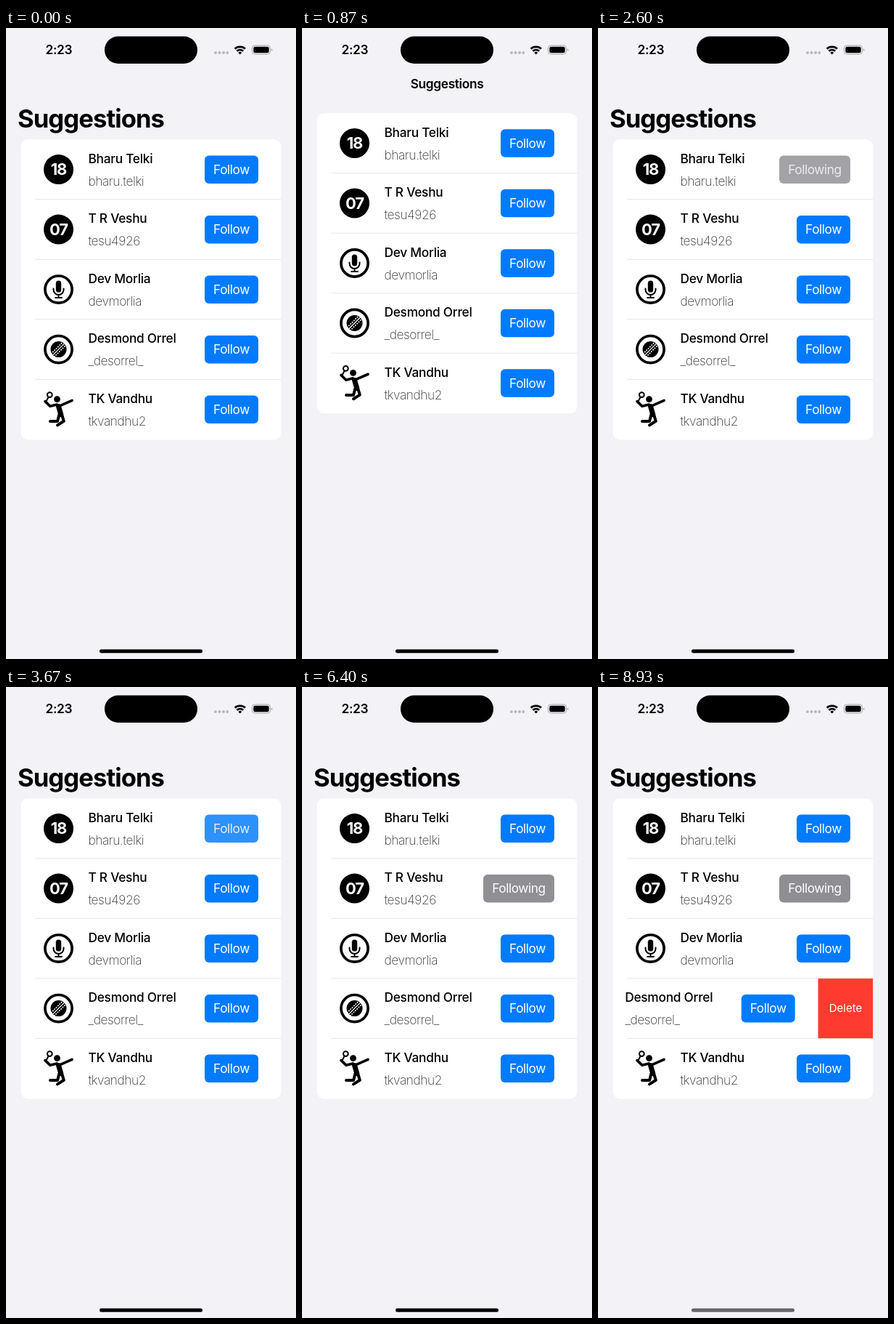
An HTML page for the animation above (9 s loop, 400 by 868 pixels).

```html
<!DOCTYPE html>
<html lang="en">
<head>
<meta charset="utf-8">
<title>Suggestions</title>
<style>
  html, body { margin: 0; width: 100%; height: 100%; overflow: hidden; background: #f2f2f7; }
  svg { display: block; width: 100%; height: 100%; }
  text { font: 400 17.3px Inter, "Liberation Sans", sans-serif; letter-spacing: -.025em; }
  .title { font-size: 34.6px; font-weight: 700; letter-spacing: -.026em; }
  .bold { font-weight: 600; letter-spacing: -.02em; }
  .name { font-weight: 500; letter-spacing: -.015em; }
  .user { font-weight: 200; fill: #333; }
  .num { font-size: 22px; font-weight: 700; fill: #fff; letter-spacing: -.05em; }
  .mid { text-anchor: middle; }
  .delete { font-size: 15px; fill: #fff; letter-spacing: 0; }
  .line { fill: none; stroke: #000; stroke-linecap: round; stroke-linejoin: round; }
</style>
</head>
<body>
<svg viewBox="0 0 400 868">
  <defs>
    <clipPath id="below"><rect y="105" width="400" height="763"/></clipPath>
    <clipPath id="cardClip"><rect x="20.4" y="153.3" width="359.2" height="413.2" rx="10"/></clipPath>
  </defs>
  <rect width="400" height="868" fill="#f2f2f7"/>

  <g clip-path="url(#below)"><text id="large" class="title" x="16" y="137.3">Suggestions</text></g>
  <text id="inline" class="bold mid" x="200" y="83">Suggestions</text>

  <g id="card"><g id="list" clip-path="url(#cardClip)">
    <rect x="20" y="153" width="360" height="414" fill="#fff"/>
  </g></g>

  <text class="bold" x="54.5" y="36">2:23</text>
  <rect x="136" y="11.5" width="128" height="37.5" rx="18.7"/>
  <g fill="#b9b9bd">
    <circle cx="289" cy="34" r="2"/><circle cx="294.5" cy="34" r="2"/>
    <circle cx="300" cy="34" r="2"/><circle cx="305.3" cy="34" r="2"/>
  </g>
  <g class="line" stroke-width="2.7" style="stroke-linecap:butt">
    <path d="M315.6 28.6a10.6 10.6 0 0 1 14.4 0M318.4 31.8a6.6 6.6 0 0 1 8.8 0"/>
  </g>
  <path d="M322.8 36.4l-2.4-2.5a3.5 3.5 0 0 1 4.8 0z"/>
  <rect x="339.5" y="24" width="25" height="12" rx="3.8" fill="none" stroke="#a4a4a8"/>
  <rect x="341.3" y="25.7" width="21.4" height="8.6" rx="2.4"/>
  <path d="M366 28.2q1.5.5 1.5 1.9t-1.5 1.9z" fill="#a4a4a8"/>
  <rect id="home" x="129" y="854.7" width="142" height="5" rx="2.5"/>
</svg>
<script>
const LOOP = 9000, ROW = 82.5, FIRST = 194.6, SWIPE = 77, EDGE = 379.6;
const $ = id => document.getElementById(id);
const clamp = v => Math.max(0, Math.min(1, v));
const smooth = v => { v = clamp(v); return v * v * (3 - 2 * v); };
const easeOut = v => 1 - (1 - clamp(v)) ** 3;
const spring = v => v > 0 ? 1 - (1 + v) * Math.exp(-v) : 0;
const mix = (a, b, k) => `rgb(${a.map((v, i) => Math.round(v + (b[i] - v) * k))})`;
const move = (id, x, y) => $(id).setAttribute('transform', `translate(${x} ${y})`);

const ring = '<circle class="line" r="18.6" stroke-width="3.7"/>';
const badge = n => `<circle r="20.5"/><text class="num mid" y="7.8">${n}</text>`;
const icons = [
  badge('18'),
  badge('07'),
  ring + `<rect x="-3.7" y="-12" width="7.4" height="16" rx="3.7"/>
    <path class="line" stroke-width="2" d="M-7 -1v1.5a7 7 0 0 0 14 0v-1.5M0 7.5v4M-4.5 11.5h9"/>`,
  ring + `<circle r="11"/><g transform="rotate(-45)" fill="none" stroke="#fff">
    <path stroke-width="1.2" d="M-12 0h24"/>
    <path stroke-width="1.6" stroke-dasharray="1.8 1.5" d="M-12 -3h24M-12 3h24"/></g>`,
  `<circle class="line" cx="-12.2" cy="-20" r="3.4" stroke-width="2"/>
    <circle cx="-2" cy="-14" r="4.4"/>
    <path class="line" stroke-width="2" d="M-14 -16.8l-2.6 5"/>
    <path class="line" stroke-width="3.6" d="M-18.5 -11l6.8 6.7 9.2 -2.4M2 -5l16.6 -7.2"/>
    <path class="line" stroke-width="7" d="M0 -4l3.2 11"/>
    <path class="line" stroke-width="4" d="M1 7l-2.5 9.5h-10M4.5 7l2.8 9.2 -8.8 5.6"/>`
];
const people = [
  ['Bharu Telki', 'bharu.telki'],
  ['T R Veshu', 'tesu4926'],
  ['Dev Morlia', 'devmorlia'],
  ['Desmond Orrel', '_desorrel_'],
  ['TK Vandhu', 'tkvandhu2']
];

$('list').innerHTML += people.map(([name, user], i) => `
  <g transform="translate(0 ${FIRST + i * ROW})">
    <g id="row${i}">
      <g transform="translate(72.5 0)">${icons[i]}</g>
      <text class="name" x="113.5" y="-8.9">${name}</text>
      <text class="user" x="113.5" y="22.1">${user}</text>
      <rect id="box${i}" y="-19.2" height="38.5" rx="6"/>
      <text id="label${i}" class="mid" y="6.3"></text>
    </g>
    ${i < 4 ? '<path d="M40 41.2h340" stroke="#e6e6ea"/>' : ''}
    ${i == 3 ? `<svg id="delete" y="-41" width="0" height="82.3">
      <rect width="100%" height="100%" fill="#ff3b30"/>
      <text class="delete mid" x="50%" y="46.4">Delete</text></svg>` : ''}
  </g>`).join('');

// Drag up, pull back past the top, then settle
function scrollAt(t) {
  if (t < 740) return -50 * smooth((t - 370) / 370);
  if (t < 1160) return -50 + 60 * smooth((t - 740) / 420);
  return 10 - 10 * easeOut((t - 1160) / 570);
}

// Times at which each row's button toggles
const taps = [[2600, 3600], [4800, 5200, 6000], [], [], []];
const looks = {
  Follow: { w: 74, from: [48, 147, 255], to: [0, 122, 255] },
  Following: { w: 98, from: [163, 163, 167], to: [142, 142, 147] }
};

function drawButton(i, t) {
  const done = taps[i].filter(v => v <= t);
  const word = done.length % 2 ? 'Following' : 'Follow';
  const k = done.length ? smooth((t - done[done.length - 1]) / 470) : 1;
  const { w, from, to } = looks[word], box = $('box' + i), label = $('label' + i);
  box.setAttribute('x', 348 - w);
  box.setAttribute('width', w);
  box.setAttribute('fill', mix(from, to, k));
  label.setAttribute('x', 348 - w / 2);
  label.setAttribute('fill', mix([236, 236, 238], [255, 255, 255], k));
  label.textContent = word;
}

function draw(t) {
  const y = scrollAt(t), collapsed = smooth((-y - 24) / 10);
  move('large', 0, y);
  move('card', 0, y);
  $('large').setAttribute('opacity', 1 - collapsed);
  $('inline').setAttribute('opacity', collapsed);
  people.forEach((_, i) => drawButton(i, t));

  const x = SWIPE * spring((t - 7950) / 146);
  move('row3', -x, 0);
  $('delete').setAttribute('x', EDGE - x);
  $('delete').setAttribute('width', x);
  $('home').setAttribute('fill', mix([0, 0, 0], [104, 104, 108], smooth((t - 8300) / 500)));
}

function tick() {
  draw(performance.now() % LOOP);
  requestAnimationFrame(tick);
}
tick();
</script>
</body>
</html>
```
